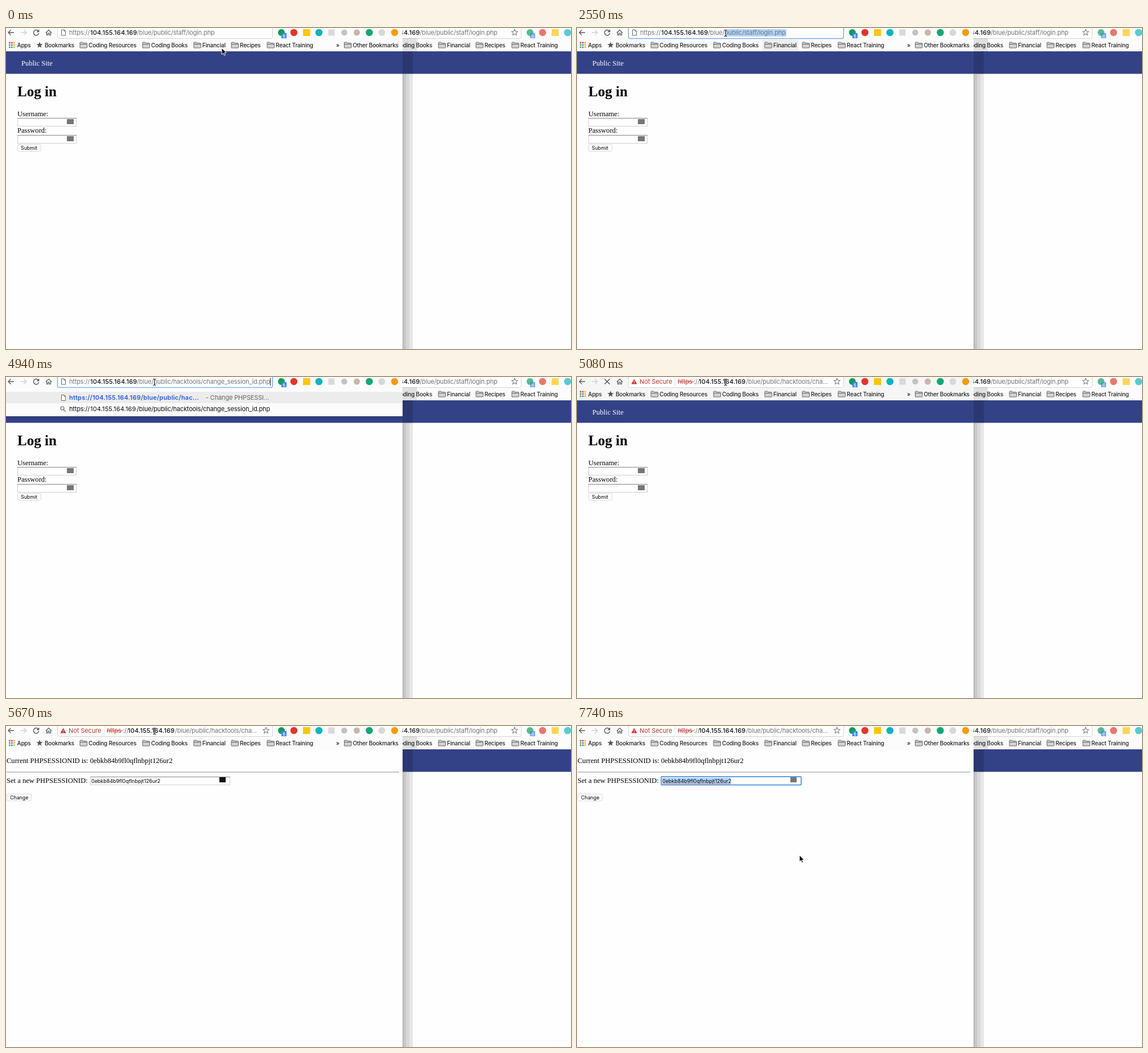
Write an HTML page with a canvas that moves like this. It is 993x564 px and loops after 8 s.

```html
<!DOCTYPE html>
<html lang="en">
<head>
<meta charset="utf-8">
<style>
html, body { margin: 0; width: 100%; height: 100%; overflow: hidden; background: #fff; }
canvas { display: block; }
</style>
</head>
<body>
<canvas id="stage" width="993" height="564"></canvas>
<script>
const ctx = document.getElementById('stage').getContext('2d');
const LOOP = 8000, EDGE = 697;
const SERIF = '12.56px "Liberation Serif", serif';
const ui = (size, weight = 400) => `${weight} ${size}px Inter, sans-serif`;
const HOST = '104.155.164.169', SID = '0ebkb84b9fl0qflnbpjt126ur2';
const LOGIN = '/blue/public/staff/login.php';
const HACK = '/blue/public/hacktools/change_session_id.php';
const BLUE = '#334287', GREY = '#757575', RED = '#c5362c', SELECT = '#b0d5fb';

// Pointer stops: time, x, y, shape
const POINTER = [
  [0, 379, 35, 'arrow'], [150, 377, 30, 'arrow'], [310, 372, 18, 'arrow'], [470, 369, 9, 'beam'],
  [1670, 362, 9, 'beam'], [1820, 342, 9, 'beam'], [1960, 318, 9, 'beam'], [2110, 295, 9, 'beam'],
  [2260, 277, 9, 'beam'], [2400, 266, 9, 'beam'], [2550, 261, 9, 'beam'],
  [3590, 261, 8, 'arrow'], [3740, 261, 9, 'beam'],
  [6120, 263, 35, 'arrow'], [6270, 267, 80, 'arrow'], [6410, 272, 112, 'arrow'],
  [6550, 274, 104, 'arrow'], [6700, 275, 97, 'beam'],
  [7140, 190, 97, 'beam'], [7290, 129, 97, 'beam'], [7740, 391, 227, 'arrow']
];

function text(s, x, y, font, color = '#000', spacing = 0) {
  ctx.font = font;
  ctx.letterSpacing = spacing + 'px';
  ctx.fillStyle = color;
  ctx.fillText(s, x, y);
}
function rect(x, y, w, h, color) {
  ctx.fillStyle = color;
  ctx.fillRect(x, y, w, h);
}
function disc(x, y, r, color) {
  ctx.fillStyle = color;
  ctx.beginPath();
  ctx.arc(x, y, r, 0, 7);
  ctx.fill();
}
function box(x, y, w, h, r, fill, stroke, line = 1) {
  ctx.beginPath();
  ctx.roundRect(x, y, w, h, r);
  ctx.fillStyle = fill;
  ctx.fill();
  ctx.strokeStyle = stroke;
  ctx.lineWidth = line;
  ctx.stroke();
}
function path(d, x, y, stroke, fill, line = 1.3) {
  const p = new Path2D(d);
  ctx.save();
  ctx.translate(x, y);
  if (fill) { ctx.fillStyle = fill; ctx.fill(p); }
  if (stroke) { ctx.strokeStyle = stroke; ctx.lineWidth = line; ctx.stroke(p); }
  ctx.restore();
}
function star(x, y, stroke, fill) {
  let d = '';
  for (let i = 0; i < 10; i++) {
    const a = i * Math.PI / 5 - Math.PI / 2, r = i % 2 ? 2.5 : 5.8;
    d += (i ? 'L' : 'M') + r * Math.cos(a) + ' ' + r * Math.sin(a);
  }
  path(d + 'Z', x, y, stroke, fill, 1);
}
const url = (s, x, y, color) => text(s, x, y, ui(11), color, -.16);
const host = (x, y, weight = 500) => text(HOST, x, y, ui(11, weight), '#111', .16);
const pageIcon = y => path('M0 0H4.5L7 2.5V10H0ZM4.5 0V2.5H7', 97.5, y, '#666', '#fff', 1);

function address(x, y, tail, color = GREY, weight = 500) {
  url('https://', x, y, color);
  host(x + 37, y, weight);
  url(tail, x + 119, y, color);
}
function label(s, x) { text(s, x, 33.5, ui(10, 500), '#222', -.2); }
function folder(s, x) {
  path('M.5 10V1.5Q.5 .5 1.5 .5H5L6 2H12Q13 2 13 3V9.5Q13 10.5 12 10.5H1Q.5 10.5 .5 10ZM.5 4H13', x - 15.5, 24.5, '#666', '#d2d2d2', 1);
  label(s, x);
}
function folders(dx) {
  folder('Coding Books', 255 + dx);
  folder('Financial', 345 + dx);
  folder('Recipes', 411 + dx);
  folder('React Training', 474 + dx);
}
function extensions(dx) {
  disc(484 + dx, 8, 6, '#0a9d58');
  rect(484 + dx, 9, 9, 9, '#3f83ea');
  text('6', 486.3 + dx, 16.5, ui(7.5, 500), '#fff');
  disc(506 + dx, 8, 6.2, '#e2362b');
  rect(522 + dx, 2, 12.5, 12, '#fbc60c');
  disc(550 + dx, 8, 6.3, '#0cb4bd');
  rect(566.5 + dx, 2.5, 11, 11, '#d9d9d9');
  disc(594.5 + dx, 8, 5.3, '#c3c3c3');
  disc(616.5 + dx, 8, 5.5, '#c9b7a7');
  disc(638.5 + dx, 8, 6.2, '#10a876');
  disc(660.5 + dx, 8, 6, '#d8d8d8');
  disc(683 + dx, 8, 6.2, '#f59c0d');
}

function rightWindow() {
  rect(EDGE, 0, 296, 41, '#fcfcfc');
  box(500, -4, 405.5, 22.5, 3, '#fff', '#d5d5d5');
  address(608, 12, LOGIN);
  star(894, 8, '#666');
  ctx.globalAlpha = .68;
  extensions(437);
  ctx.globalAlpha = 1;
  folders(430);
  rect(EDGE, 41, 296, 40, '#fefefe');
  rect(EDGE, 41, 296, 39.5, BLUE);
  rect(EDGE, 81, 296, 483, '#fefefe');
  rect(EDGE, 18, 25, 23, 'rgba(0,0,0,.11)');
  rect(EDGE, 41, 18, 40, 'rgba(0,0,0,.16)');
  rect(EDGE, 81, 6, 483, '#c6c6c6');
  rect(703, 81, 6, 483, '#d7d7d7');
  rect(709, 81, 6, 483, '#e7e7e7');
  rect(EDGE, 81, 1, 483, '#a9a9a9');
}

function toolbar(t, pointer) {
  const loading = t >= 5080 && t < 5670, visited = t >= 5080;
  const focus = t >= 1070 && !visited;
  rect(0, 0, EDGE, 41, loading ? '#f6f6f6' : '#fcfcfc');
  path('M10 0H0M4.5 -4.5L0 0L4.5 4.5', 4, 8, '#555');
  path('M0 0H10M5.5 -4.5L10 0L5.5 4.5', 26, 8, '#d0d0d0');
  if (loading) path('M-4.5 -4.5L4.5 4.5M4.5 -4.5L-4.5 4.5', 53, 8, '#555', null, 1.5);
  else {
    path('M3.5 -3A4.7 4.7 0 1 0 4.7 1', 53, 8, '#555', null, 1.4);
    path('M5.3 -5.5V-.8H.6Z', 53, 8, null, '#555');
  }
  path('M-5 .5L0 -4.5L5 .5M-3.5 0V4.5H-1.2V1H1.2V4.5H3.5V0', 75, 8, '#555', null, 1.2);
  box(90.5, -4, 378, 22.5, 3, '#fff', focus ? '#77aced' : '#d5d5d5', focus ? 1.4 : 1);

  if (visited) {
    path('M0 9L5 0L10 9Z', 95.5, 3.5, null, RED);
    rect(100, 7, 1, 2.6, '#fff');
    rect(100, 10.5, 1, 1, '#fff');
    text('Not Secure', 110, 12, ui(11), RED, -.1);
    rect(172, 1, 1, 15, '#ddd');
    url('https', 177, 12, RED);
    rect(177, 8, 28, 1, RED);
    url('://', 205, 12, GREY);
    host(214, 12);
    url(HACK.slice(0, 26) + '...', 297, 12, GREY);
    star(457, 8, '#666');
  } else {
    pageIcon(3);
    if (t >= 1670 && t < 3590) rect(pointer.x - 1, 2, 369 - pointer.x, 13, SELECT);
    address(111, 12, t < 3590 ? LOGIN : HACK);
    if (t >= 3590 && (t < 4190 || t >= 4790)) rect(464, 2, 1, 13, '#111');
  }
  extensions(0);

  if (t >= 150 && t < 3590) rect(326, 19, 63, 22, '#eeeeee');
  const dots = ['#e0483e', '#e0483e', '#f0b429', '#43a85b', '#4386ea', '#f0b429', '#43a85b', '#4386ea', '#f0b429'];
  dots.forEach((c, i) => rect(5 + i % 3 * 4, 24.5 + Math.floor(i / 3) * 4, 2.7, 2.7, c));
  label('Apps', 19.5);
  star(59, 30, null, '#555');
  label('Bookmarks', 68);
  folder('Coding Resources', 145);
  folders(0);
  label('»', 580);
  folder('Other Bookmarks', 609.5);
}

function suggestions(t) {
  rect(0, 19, EDGE, 50, '#fcfcfc');
  rect(0, 26, EDGE, 20, '#ececec');
  pageIcon(31.5);
  const full = 'https://' + HOST + HACK, titled = t >= 3740;
  text(full.slice(0, titled ? 39 : 60) + '...', 111, 40, ui(11, 600), '#2a5bd7', .22);
  if (titled) url('- Change PHPSESSI...', 351, 40, '#666');
  path('M6 3A3 3 0 1 1 0 3A3 3 0 1 1 6 3M5.2 5.2L9 9', 96, 52, '#666', null, 1.1);
  address(111, 60, HACK, '#111', 400);
  const shade = ctx.createLinearGradient(0, 69, 0, 75);
  shade.addColorStop(0, 'rgba(0,0,0,.16)');
  shade.addColorStop(1, 'rgba(0,0,0,0)');
  rect(0, 69, EDGE, 6, shade);
}

function field(x, y, w) {
  rect(x, y, w, 15, '#cfcfcf');
  rect(x, y, w, 1, '#858585');
  rect(x + 1, y + 1, w - 2, 13, '#fff');
}
function button(s, x, y, w) {
  box(x + .5, y + .5, w - 1, 12, 2.5, '#fff', '#dadada');
  text(s, x + 6, y + 10, ui(8.8), '#000');
}
function loginPage() {
  rect(0, 41, EDGE, 39.5, BLUE);
  text('Public Site', 27, 66, SERIF, '#fff');
  text('Log in', 20, 120, 'bold 25.1px "Liberation Serif", serif');
  text('Username:', 20, 155, SERIF);
  text('Password:', 20, 184, SERIF);
  for (const y of [158, 188]) {
    field(20, y, 104);
    rect(107, y + 2, 12, 9, '#777');
  }
  button('Submit', 20, 204, 42);
}
function sessionPage(t, pointer) {
  text('Current PHPSESSIONID is: ' + SID, 1, 65, SERIF);
  rect(1, 80.5, 690, 1, '#929292');
  text('Set a new PHPSESSIONID:', 1, 100, SERIF);
  const focus = t >= 6990;
  field(148, 89, 246);
  if (focus) box(148, 89, 246, 14.5, 1, '#fff', '#5f9fe8', 2);
  if (t >= 7140) {
    const from = t >= 7290 ? 150 : pointer.x;
    rect(from, 91, 270 - from, 11, SELECT);
  }
  text(SID, 150, 100, ui(9), '#000', -.03);
  if (t >= 7740) for (let x = 150; x < 270; x += 3) rect(x, 101.2, 1.8, 1.2, '#e0524b');
  rect(375, 90, 11, 9, focus ? '#777' : '#111');
  button('Change', 1, 119, 44);
}

function drawPointer({ x, y, shape }) {
  if (shape === 'beam') {
    const d = 'M-2.5 -5.5Q0 -5.5 0 -4Q0 -5.5 2.5 -5.5M0 -4V4M-2.5 5.5Q0 5.5 0 4Q0 5.5 2.5 5.5';
    path(d, x, y, 'rgba(255,255,255,.7)', null, 2.4);
    path(d, x, y, '#111', null, 1.1);
  } else {
    path('M0 0V11.5L2.7 9L4.5 13.2L6.5 12.3L4.7 8.2H8.2Z', x, y, '#fff', '#000', 1);
  }
}

function draw(t) {
  const [, x, y, shape] = POINTER.findLast(p => p[0] <= t);
  const pointer = { x, y, shape };
  rightWindow();
  ctx.save();
  ctx.beginPath();
  ctx.rect(0, 0, EDGE, 564);
  ctx.clip();
  rect(0, 0, EDGE, 564, '#fefefe');
  toolbar(t, pointer);
  if (t < 5670) loginPage();
  else sessionPage(t, pointer);
  if (t >= 3590 && t < 5080) suggestions(t);
  drawPointer(pointer);
  ctx.restore();
}

const start = performance.now();
function tick() {
  draw((performance.now() - start) % LOOP);
  requestAnimationFrame(tick);
}
tick();
</script>
</body>
</html>
```
